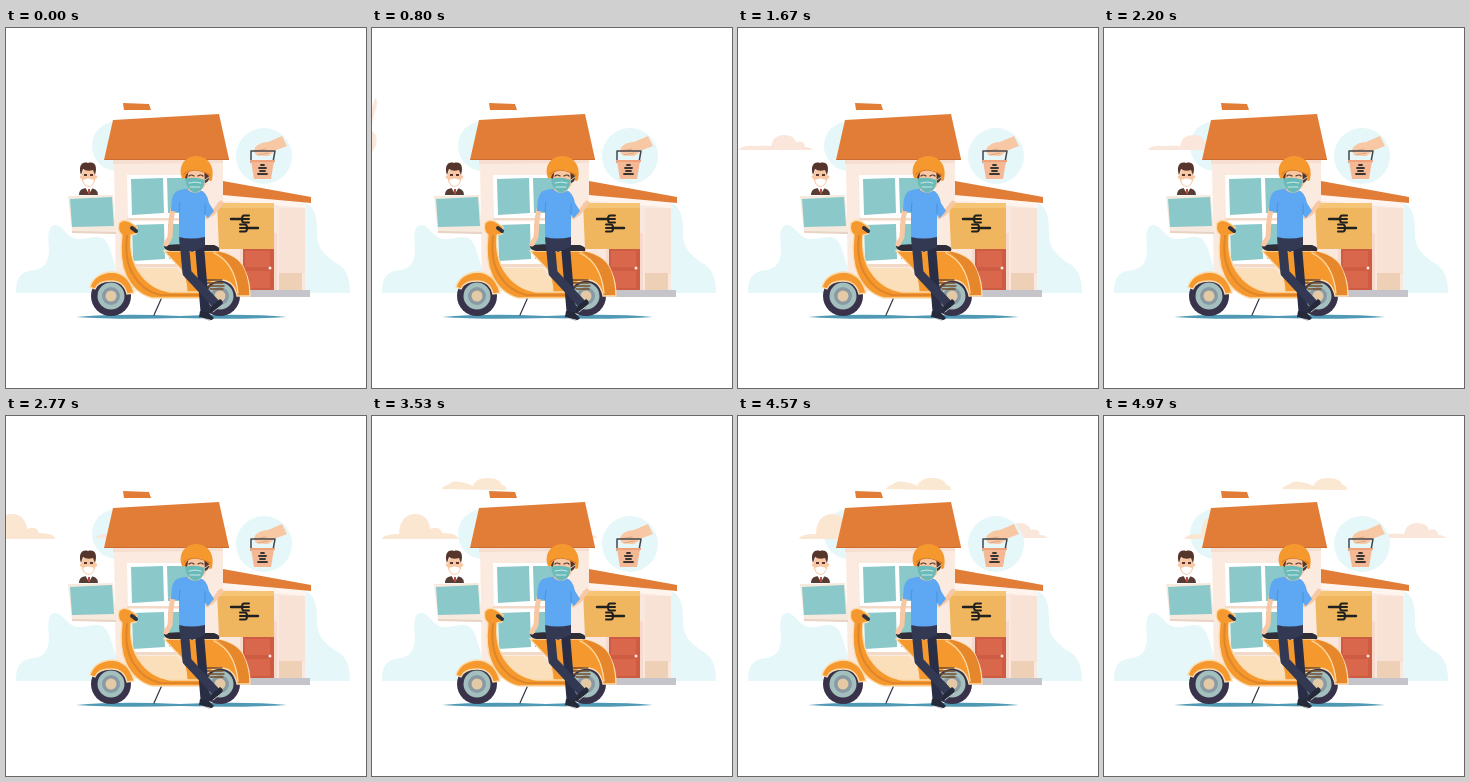
Write an HTML page that moves like this. It is 360 by 360 pixels and loops after 5 s.

```html
<!DOCTYPE html>
<html lang="en">
<head>
<meta charset="utf-8">
<title>Scooter delivery</title>
<style>
html, body { margin: 0; width: 100%; height: 100%; overflow: hidden; background: #fff; }
svg { display: block; width: 100vw; height: 100vh; }
.cloud { animation: 5s linear infinite; }
.low { fill: #fbe6dc; transform-origin: 36px 115px; animation-name: low; }
.mid { fill: #fbe6d2; transform-origin: 38px 110px; animation-name: mid; }
.high { fill: #fbe8d3; animation-name: high; }
/* The two lower clouds roll in, then drift; the upper one slides. */
@keyframes low {
  0%, 12% { transform: translate(-110px, 0) rotate(-360deg); }
  16% { transform: translate(-37px, -9px) rotate(-253deg); }
  25% { transform: translate(-33px, 0) rotate(0deg); }
  100% { transform: translate(270.4px, 0) rotate(0deg); }
}
@keyframes mid {
  0%, 34% { transform: translate(-115px, 0) rotate(-360deg); }
  48% { transform: translate(-45px, 0) rotate(0deg); }
  100% { transform: translate(82px, 0) rotate(0deg); }
}
@keyframes high {
  0%, 55.6% { transform: translateX(-70px); animation-timing-function: ease-out; }
  68% { transform: translateX(60px); }
  100% { transform: translateX(180.5px); }
}
.teal { fill: #e5f7f8; }
.glass { fill: #8ac8c9; }
.roof { fill: #e27d38; }
.skin { fill: #f8c8a4; }
.orange { fill: #f5982d; }
.rim { stroke: #fbdcae; stroke-width: 1.3; }
.line { fill: none; stroke-linecap: round; stroke-linejoin: round; }
</style>
</head>
<body>
<svg viewBox="0 0 360 360">
  <defs>
    <g id="wheel">
      <circle r="20" fill="#38324a"/>
      <circle r="13.5" fill="#a3c0bf"/>
      <circle r="9" fill="#8a9aa4"/>
      <circle r="5.5" fill="#e3c9a5"/>
    </g>
    <g id="pane">
      <path fill="#fff" d="M-4-4H72V39H-3Z"/>
      <path class="glass" d="M0 0 32-1 33 34 1 36ZM36-1H65V34H37Z"/>
    </g>
    <g id="fork" class="line" stroke="#20201f">
      <path stroke-width="2.4" d="M0 0H12"/>
      <path stroke-width="2" d="M18-3.5H13Q11-3.5 11 0T13 3.5H18M12 0H18"/>
    </g>
  </defs>

  <!-- backdrop -->
  <g class="teal">
    <path d="M10 265C10 247 17 243 29 242C39 240 43 233 43 221C41 205 43 197 49 197C57 197 60 209 71 211C82 212 90 206 98 211C105 217 106 232 112 245V265Z"/>
    <path d="M294 174C306 175 311 184 311 202C310 221 319 226 328 234C340 239 344 249 344 265H294Z"/>
    <circle cx="111" cy="118" r="25"/>
  </g>

  <path class="cloud low" d="M0 122Q2 117 18 118Q27 117 32 118Q34 107 45 107Q55 107 57 114Q66 112 66 119Q72 119 74 122Z"/>
  <path class="cloud mid" d="M0 123Q1 118 17 118C17 106 23 98 33 98C43 98 47 105 48 113Q57 109 60 117Q75 117 76 123Z"/>
  <path class="cloud high" d="M0 73Q2 69 6 69Q10 64 19 66Q26 67 31 70Q35 61 46 62Q58 62 60 69Q64 69 65 74Q33 74 0 73Z"/>

  <circle class="teal" cx="258" cy="128" r="28"/>

  <!-- main house -->
  <path class="roof" d="M117 75 143 76 145 82 118 82Z"/>
  <path fill="#fbeae0" d="M108 131H217V263H110Z"/>
  <path fill="#f6dfd1" d="M107 131H217V135L107 136Z"/>
  <path class="roof" d="M107 92 213 86 223 131 98 132Z"/>
  <path fill="#cb6c31" d="M99 131H223V132H98Z"/>
  <use href="#pane" x="125" y="151"/>
  <use href="#pane" x="126" y="197"/>
  <path fill="#f2d9c8" d="M121 190H197V192H121ZM122 236H197V239H122Z"/>

  <!-- annex -->
  <path fill="#fae8de" d="M217 166 299 176V263H217Z"/>
  <path fill="#fff5ee" d="M217 167 300 175V180L217 173Z"/>
  <path fill="#f8e2d6" d="M273 180H299V246H273Z"/>
  <path fill="#eed0b7" d="M273 245H296V263H273Z"/>
  <path class="roof" d="M217 153 305 169V175L217 167Z"/>
  <path fill="#f7d9cd" d="M234 205H271V262H234Z"/>
  <path fill="#ce5c43" d="M237 207H268V262H237Z"/>
  <path fill="#d9674c" d="M239 223H264V239H239ZM239 243H264V260H239Z"/>
  <circle cx="264" cy="240" r="1.5" fill="#fae8de"/>
  <path fill="#c5c4ca" d="M216 262H304V269H216Z"/>

  <!-- man at the window -->
  <path fill="#573b35" d="M73 167C73 161 77 160 83 160Q92 160 92 167Z"/>
  <path fill="#fff" d="M79 159H87L83 166Z"/>
  <path fill="#b84b3c" d="M82 161H84V166H82Z"/>
  <ellipse class="skin" cx="82.5" cy="149" rx="7" ry="10"/>
  <circle class="skin" cx="75.5" cy="149" r="1.8"/>
  <circle class="skin" cx="89.5" cy="149" r="1.8"/>
  <path fill="#fff" d="M77 152Q82 149 88 152Q87 158 82 158Q78 157 77 152Z"/>
  <path fill="#56352c" d="M75 147C72 138 76 133 82 135C88 133 92 137 89 147L87 142Q81 144 77 141Z"/>
  <path fill="#56352c" d="M78 146H81V148H78ZM84 146H87V148H84Z"/>
  <path fill="#f6e9de" d="M62 168 107 167 110 206 66 204Z"/>
  <path class="glass" d="M64 171 106 169 108 198 66 199Z"/>
  <path fill="#e8d3c4" d="M66 203 110 204V206L66 205Z"/>

  <!-- hand and bucket -->
  <path class="skin" d="M248 123C248 118 255 114 262 114L276 108 281 118 268 123Q264 129 259 128L250 127Z"/>
  <path class="line" stroke="#dba582" stroke-width="1" d="M249 123 260 121M252 127 262 125"/>
  <path class="line" stroke="#45474e" stroke-width="1.5" d="M245 134V123H269L267 134"/>
  <path fill="#f5b895" d="M245 133H268L265 151H248Z"/>
  <path fill="#eda27c" d="M244 132H269V134H244Z"/>
  <path class="line" stroke="#383532" stroke-width="1.8" d="M255 137H258M253 140H260M254 143H259M252 146H261"/>

  <!-- scooter -->
  <path fill="#5099b5" d="M70 289Q112 285 174 288Q240 285 281 289Q237 292 174 290Q112 292 70 289Z"/>
  <path class="line" stroke="#303443" stroke-width="1.2" d="M156 269 148 287"/>
  <use href="#wheel" x="105" y="268"/>
  <use href="#wheel" x="214" y="268"/>
  <path fill="#fbdfba" d="M127 240H171Q181 250 181 267H147Z"/>
  <path class="orange rim" d="M158 223H206Q233 225 239 243Q244 254 244 268H231Q228 252 214 252Q199 253 197 268H181Q181 246 172 238Z"/>
  <path fill="#e7872b" d="M210 223Q233 227 239 243Q243 254 243 267H232Q232 238 210 223Z"/>
  <path class="line rim" d="M208 225Q229 235 232 265"/>
  <path class="orange rim" d="M84 259Q88 246 104 244Q123 244 128 265L121 266Q118 253 105 253Q92 253 89 261Z"/>
  <path class="orange rim" d="M113 195Q117 190 124 194L131 199 130 206 125 207Q123 230 133 244Q144 261 164 264H197V270H146Q128 265 120 247Q113 232 116 207Q111 203 113 195Z"/>
  <path class="line" stroke="#e08529" stroke-width="2" d="M121 208Q118 233 128 248Q137 263 154 267H193"/>
  <path fill="#2f2e38" d="M158 218Q166 215 185 217H208Q215 219 213 223H164Q158 222 158 218Z"/>
  <path class="line" stroke="#30333d" stroke-width="4" d="M126 200 130 203"/>
  <path class="line" stroke="#754c29" stroke-width="1.4" d="M199 252H216M200 255H217M202 258H218M204 261H217"/>

  <!-- parcel -->
  <path fill="#efb65f" d="M211 175H268V221H213Z"/>
  <path fill="#f5c475" d="M211 175H268V180H211Z"/>
  <use href="#fork" x="225" y="191"/>
  <use href="#fork" transform="translate(252 200) scale(-1 1)"/>

  <!-- courier -->
  <path class="line" stroke="#292e46" stroke-width="9" d="M193 212 196 248 199 283"/>
  <path class="line" stroke="#333953" stroke-width="9" d="M178 212 181 245 209 275"/>
  <path fill="#333953" d="M173 207H199V219L186 224 174 219Z"/>
  <path fill="#252a3b" d="M194 283 202 284 208 290Q206 293 202 292L193 289Z"/>
  <path fill="#252a3b" d="M206 278 214 271Q219 274 215 278L208 284Q203 286 203 283Z"/>
  <path class="line" stroke="#e9edf0" stroke-width=".8" d="M195 290 204 292M207 284 216 277"/>
  <path class="line" stroke="#f8c8a4" stroke-width="5" d="M168 176 165 192 164 209 160 216"/>
  <path class="line" stroke="#f8c8a4" stroke-width="4.5" d="M201 189 207 185 215 175"/>
  <path fill="#5ea7f2" d="M171 163Q181 159 194 162Q201 164 203 175L208 183 202 190 199 187 199 209Q185 212 173 209L173 184 165 183Q165 166 171 163Z"/>
  <path class="line" stroke="#468dd3" stroke-width=".8" d="M174 174 173 184M199 176V186"/>
  <path class="skin" d="M182 157H196V162Q189 168 182 162Z"/>
  <path class="skin" d="M178 143H201Q203 162 189 164Q179 162 178 143Z"/>
  <path fill="#573528" d="M177 144 183 141 181 151Q178 151 177 144ZM198 140 204 144Q204 154 199 155Z"/>
  <path class="line" stroke="#573528" stroke-width="1.2" d="M183 148Q185 146 188 148M192 148Q195 146 197 148"/>
  <path fill="#69bab9" d="M179 151Q188 148 199 152Q198 163 189 165Q180 162 179 151Z"/>
  <path class="line" stroke="#d4f0ec" stroke-width=".9" d="M199 152 203 149M183 155Q189 153 195 155M184 159H194"/>
  <path class="orange" d="M175 147C173 135 181 128 191 128C203 129 209 139 206 152Q202 155 203 148Q197 141 189 142Q181 142 179 150Q176 152 175 147Z"/>
  <path class="line" stroke="#dd7a24" stroke-width="1.2" d="M178 146Q188 138 204 147"/>
</svg>
</body>
</html>
```
